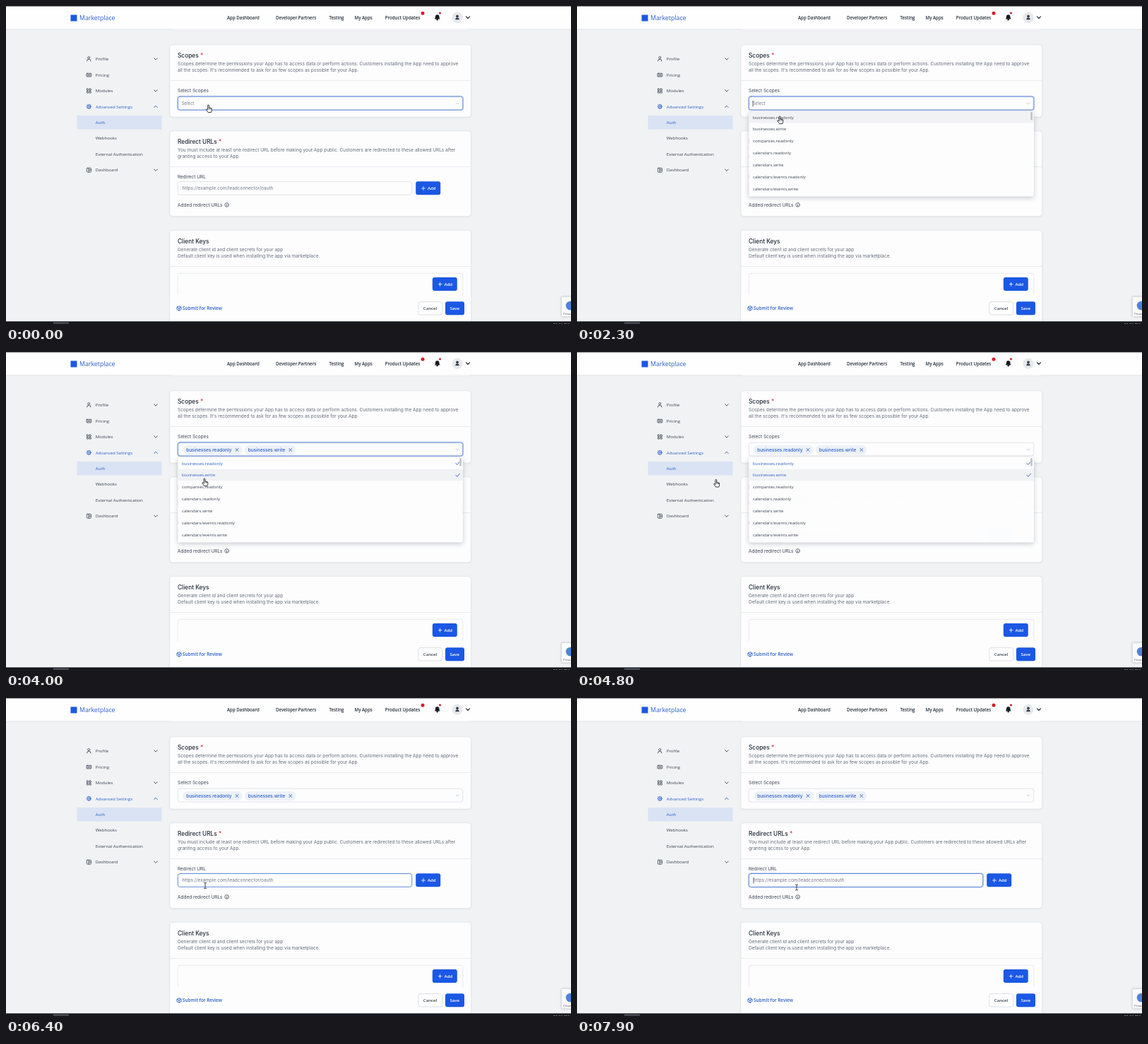
An HTML page with a canvas that plays this animation: 800 by 450 pixels, repeating every 8000 ms.

```html
<!DOCTYPE html>
<html lang="en">
<head>
<meta charset="utf-8">
<title>App scopes</title>
<style>
html, body { margin: 0; width: 100%; height: 100%; overflow: hidden; background: #f0f2f4; }
canvas { display: block; width: 800px; height: 450px; }
</style>
</head>
<body>
<canvas id="stage"></canvas>
<script>
const canvas = document.getElementById('stage');
const ratio = window.devicePixelRatio || 1;
canvas.width = 800 * ratio;
canvas.height = 450 * ratio;
const c = canvas.getContext('2d');

const LOOP = 8000;
const UI = '"Open Sans", "Noto Sans", sans-serif';
const INTER = 'Inter, sans-serif';
const BLUE = '#1b58e3', LINK = '#2a5fc9', INK = '#232b38', TEXT = '#3b4350', MUTED = '#636a76', LINE = '#e3e6ea';

const SCOPES = ['businesses.readonly', 'businesses.write', 'companies.readonly', 'calendars.readonly',
  'calendars.write', 'calendars/events.readonly', 'calendars/events.write'];
const ROW = 16.85;

// Moments of the interaction, in ms
const OPEN = 1700, PICK_1 = 2800, PICK_2 = 3600, CLOSE = 4800, FOCUS_URL = 6900;
const POINTER = [
  [0, 286.5, 140], [1800, 286.5, 140], [2200, 287, 156], [2900, 287, 156], [3400, 281, 174],
  [3700, 281, 179], [4200, 281, 179], [4900, 192, 180.5], [5500, 192, 180.5],
  [6200, 282, 265.5], [7000, 282, 265.5], [7600, 311, 268], [8000, 311, 268]
];

function text(s, x, y, size = 6.49, color = TEXT, font = INTER, weight = 400) {
  c.font = `${weight} ${size}px ${font}`;
  c.fillStyle = color;
  c.fillText(s, x, y);
}

function box(x, y, w, h, r, fill, stroke, lineWidth = 0.8) {
  c.beginPath();
  c.roundRect(x, y, w, h, r);
  if (fill) { c.fillStyle = fill; c.fill(); }
  if (stroke) { c.strokeStyle = stroke; c.lineWidth = lineWidth; c.stroke(); }
}

function path(points, color, width = 0.9) {
  c.beginPath();
  points.forEach(([x, y]) => c.lineTo(x, y));
  c.strokeStyle = color;
  c.lineWidth = width;
  c.stroke();
}

function dot(x, y, r, fill, stroke, width = 0.9) {
  c.beginPath();
  c.arc(x, y, r, 0, Math.PI * 2);
  if (fill) { c.fillStyle = fill; c.fill(); }
  if (stroke) { c.strokeStyle = stroke; c.lineWidth = width; c.stroke(); }
}

function shadow(color, blur, y, draw) {
  c.save();
  c.shadowColor = color;
  c.shadowBlur = blur * ratio;
  c.shadowOffsetY = y * ratio;
  draw();
  c.restore();
}

const chevron = (x, y, dir, color, w = 2.3, width = 0.9) =>
  path([[x - w, y - dir * w / 2], [x, y + dir * w / 2], [x + w, y - dir * w / 2]], color, width);

function cross(x, y, r, color, width) {
  path([[x - r, y - r], [x + r, y + r]], color, width);
  path([[x - r, y + r], [x + r, y - r]], color, width);
}

function person(x, y, color, filled) {
  dot(x, y - 1.5, 1.5, filled && color, color, 0.8);
  c.beginPath();
  c.arc(x, y + 3.3, 2.7, Math.PI, 0);
  if (filled) { c.fillStyle = color; c.fill(); }
  else { c.lineWidth = 0.9; c.strokeStyle = color; c.stroke(); }
}

function header() {
  shadow('rgba(30,40,60,.1)', 2, 0.5, () => box(0, 0, 800, 32.5, 0, '#fefefe'));
  c.fillStyle = '#85878b';
  c.fillRect(0, 0, 800, 0.9);
  box(91.5, 12.5, 9, 9, 0, BLUE);
  text('Marketplace', 104, 20, 8.8, LINK, UI, 500);
  [['App Dashboard', 313], ['Developer Partners', 382], ['Testing', 457.5], ['My Apps', 493.5],
    ['Product Updates', 536.7]].forEach(([s, x]) => text(s, x, 18.8, 6.15, INK, UI, 600));
  dot(590, 10.3, 2.5, '#d4202b');
  c.fillStyle = '#15191f';
  c.beginPath();
  c.moveTo(606.8, 18.6);
  c.quadraticCurveTo(608, 17.5, 608, 15);
  c.arc(610.7, 15, 2.7, Math.PI, 0);
  c.quadraticCurveTo(613.4, 17.5, 614.6, 18.6);
  c.fill();
  dot(610.7, 19.2, 1.2, '#15191f');
  dot(614.5, 10, 1.6, '#d4202b');
  dot(639, 16.3, 7.6, '#e7e9ec');
  person(639, 16, '#303844', true);
  chevron(654, 16.2, 1, '#20262f', 2.6, 1.1);
}

function sidebar() {
  box(100.5, 155, 120, 19.4, 0, '#dae3f3');
  [['Profile', 75, 1], ['Pricing', 97.5, 0], ['Modules', 120, 1], ['Advanced Settings', 142.3, -1],
    ['Auth', 164.8, 0], ['Webhooks', 187.2, 0], ['External Authentication', 209.7, 0], ['Dashboard', 232.2, 1]]
    .forEach(([s, y, dir], i) => {
      const color = i === 3 || i === 4 ? LINK : TEXT;
      text(s, 126.8, y + 2.2, 6.13, color, UI);
      if (dir) chevron(212, y, dir, color);
    });
  person(117.3, 74.6, TEXT);
  box(114, 95.3, 6.8, 4.6, 0.7, null, TEXT);
  dot(117.4, 97.6, 0.9, null, TEXT, 0.7);
  path([[115.6, 95.5], [115.6, 99.8]], TEXT, 0.5);
  path([[119.2, 95.5], [119.2, 99.8]], TEXT, 0.5);
  for (const x of [114.5, 118.1]) for (const y of [117.2, 120.8]) box(x, y, 2.3, 2.3, 0.3, null, TEXT);
  dot(117.4, 142.3, 2.6, null, LINK);
  dot(117.4, 142.3, 1, null, LINK, 0.8);
  for (let i = 0; i < 8; i++) {
    const a = i * Math.PI / 4;
    dot(117.4 + 3.1 * Math.cos(a), 142.3 + 3.1 * Math.sin(a), 0.55, LINK);
  }
  box(114.4, 229.3, 6, 5.8, 0.7, null, TEXT);
  path([[117.2, 229.3], [117.2, 235.1]], TEXT);
  path([[117.2, 232], [120.4, 232]], TEXT);
}

function card(y, h, divider, title, required, lines) {
  shadow('rgba(30,40,60,.13)', 2.5, 0.6, () => box(232, y, 426.3, h, 4, '#fdfdfe'));
  box(232, y, 426.3, h, 4, null, '#e4e7eb', 0.6);
  c.fillStyle = LINE;
  c.fillRect(232, divider, 426.3, 0.7);
  text(title, 243, y + 18.3, 8.3, INK, INTER, 500);
  if (required) text('*', 243 + c.measureText(title).width + 2.3, y + 18.3, 8.3, '#d9303b', INTER, 500);
  lines.forEach((s, i) => text(s, 243, y + 29 + i * 9.3, 6.49, MUTED));
}

function field(x, y, w, h, state) {
  if (state === 'focus') box(x, y, w, h, 3, null, '#d2def6', 3.2);
  box(x, y, w, h, 3, '#fdfdfe', state ? '#547fd2' : '#dcdfe4', state ? 0.9 : 0.8);
}

function addButton(x, y) {
  box(x, y, 35, 19, 3, BLUE);
  path([[x + 8.2, y + 9.7], [x + 13.2, y + 9.7]], '#fff', 0.8);
  path([[x + 10.7, y + 7.2], [x + 10.7, y + 12.2]], '#fff', 0.8);
  text('Add', x + 16.7, y + 12, 6.1, '#fff', UI, 600);
}

function tag(s, x, w) {
  box(x, 132, w, 13, 6, '#edf1f8');
  text(s, x + 4.7, 140.8, 6.49, LINK, INTER, 500);
  cross(x + w - 7.3, 138.5, 1.9, LINK, 0.9);
}

function tick(x, y, color) {
  path([[x - 2.6, y], [x - 0.8, y + 1.9], [x + 2.8, y - 2.1]], color, 0.9);
}

function page(t) {
  c.fillStyle = '#f0f2f4';
  c.fillRect(0, 0, 800, 450);
  box(232, 20, 426.3, 14.3, 3, '#fdfdfe', '#e2e5e9', 0.6);
  header();
  sidebar();

  card(55, 102, 105.3, 'Scopes', true, [
    'Scopes determine the permissions your App has to access data or perform actions. Customers installing the App need to approve',
    "all the scopes. It's recommended to ask for as few scopes as possible for your App."]);
  text('Select Scopes', 243, 122.3);
  field(243.4, 128.2, 403.4, 18.8, t < CLOSE ? 'focus' : '');
  if (t < PICK_1) text('Select', 248.7, 140.3, 6.5, '#747b86', UI);
  else tag(SCOPES[0], 250.5, 83.8);
  if (t >= PICK_2) tag(SCOPES[1], 338, 72);
  if (t >= OPEN && t < PICK_1 && Math.floor((t - OPEN) / 500) % 2 === 1) path([[249, 134], [249, 142.2]], INK, 0.7);
  chevron(639, 138, 1, '#c2c6cc', 2.1, 0.8);

  card(177, 120.5, 227.3, 'Redirect URLs', true, [
    'You must include at least one redirect URL before making your App public. Customers are redirected to these allowed URLs after',
    'granting access to your App.']);
  text('Redirect URL', 243, 244.4);
  const hover = t >= 6050;
  field(243.4, 248.5, 331.3, 18.8, t >= FOCUS_URL ? 'focus' : hover ? 'hover' : '');
  text('https://example.com/leadconnector/oauth', 249.5, 260.4, 6.49, '#747b86');
  if (t >= FOCUS_URL && Math.floor((t - FOCUS_URL) / 500) % 2 === 0) path([[250, 254], [250, 262.3]], INK, 0.7);
  addButton(580.2, 248.3);
  text('Added redirect URLs', 243, 283.7);
  dot(312.6, 281.4, 2.8, null, TEXT, 0.8);
  path([[312.6, 281], [312.6, 283]], TEXT, 0.8);
  dot(312.6, 279.9, 0.45, TEXT);

  card(317.5, 140, 368, 'Client Keys', false, [
    'Generate client id and client secrets for your app',
    'Default client key is used when installing the app via marketplace.']);
  box(243.4, 378.3, 403.4, 40, 3, null, LINE);
  addButton(603.8, 384);
  box(232.4, 409, 425.6, 37.5, 0, '#fdfdfe');

  path([[245, 424.7], [248, 426.2], [248, 429.4], [245, 431], [242, 429.4], [242, 426.2], [245, 424.7]], LINK);
  path([[242, 426.2], [245, 427.8], [248, 426.2]], LINK);
  path([[245, 427.8], [245, 431]], LINK);
  text('Submit for Review', 250, 430.2, 6.4, LINK, UI, 600);
  box(583.8, 418.5, 34, 18.5, 3, '#fefefe', '#d6d9de');
  text('Cancel', 590.8, 430.1, 6.1, TEXT, UI, 600);
  box(622, 418.3, 27, 19, 3, BLUE);
  text('Save', 628.4, 430.1, 6.1, '#fff', UI, 600);

  shadow('rgba(80,80,90,.55)', 2.5, 0, () => box(786.5, 411.5, 24, 28, 1, '#fafafa'));
  dot(799, 424, 6.3, '#4f83d8');
  text('Privacy', 789.3, 437.4, 3.9, '#555', UI);

  c.fillStyle = '#15171c';
  c.fillRect(0, 446.3, 800, 4);
  c.fillStyle = '#42454b';
  c.fillRect(67, 446.3, 22, 4);
  text('03:36 PM', 774.5, 452.6, 5.4, '#d0d2d5', UI);
}

function menu(t, y) {
  const alpha = Math.min(1, Math.max(0, (t - OPEN) / 150)) * Math.min(1, Math.max(0, (CLOSE + 150 - t) / 150));
  if (!alpha) return;
  c.save();
  c.globalAlpha = alpha;
  shadow('rgba(30,40,60,.24)', 6, 2, () => box(243.3, 148.8, 403.6, 120.6, 2, '#fdfdfe'));
  const active = y > 166 || t > 3300 ? 1 : 0;
  box(243.3, 149 + active * ROW, 403.6, ROW - 0.4, 0, '#f1f2f4');
  SCOPES.forEach((s, i) => {
    const picked = (i === 0 && t >= PICK_1) || (i === 1 && t >= PICK_2);
    const rowY = 157.3 + i * ROW;
    text(s, 249, rowY + 2.2, 6.1, picked ? LINK : TEXT, UI);
    if (picked) tick(639.5, rowY + 0.3, LINK);
  });
  box(642.3, 150, 2.5, 11.5, 1.2, '#bfc1c5');
  c.restore();
}

function pointerAt(t) {
  const i = Math.max(1, POINTER.findIndex(p => p[0] > t));
  const [t0, x0, y0] = POINTER[i - 1], [t1, x1, y1] = POINTER[i];
  const k = (t - t0) / (t1 - t0), e = k * k * (3 - 2 * k);
  return [x0 + (x1 - x0) * e, y0 + (y1 - y0) * e];
}

function shape(d) {
  const p = new Path2D(d);
  c.fillStyle = '#fff';
  c.fill(p);
  c.strokeStyle = '#14161a';
  c.lineWidth = 0.85;
  c.stroke(p);
}

function pointer(t, x, y) {
  c.save();
  c.translate(x, y);
  if (t >= 6050) {
    path([[-1.6, -4], [-0.5, -4], [0, -3.5], [0.5, -4], [1.6, -4]], '#14161a', 0.8);
    path([[0, -3.5], [0, 3.5]], '#14161a', 0.8);
    path([[-1.6, 4], [-0.5, 4], [0, 3.5], [0.5, 4], [1.6, 4]], '#14161a', 0.8);
  } else if (x > 243 && t < CLOSE || x < 220) {
    shape('M-.9 6.2V.9Q-.9 0 0 0T.9 .9V4Q1.8 3.3 2.4 4.3Q3.2 3.8 3.7 4.7Q4.8 4.5 4.8 5.6V7.5Q4.8 9 3.9 10.6H-.3Q-1.4 8.8-2.8 7.3Q-3.4 6.5-2.8 6Q-2 5.6-.9 6.8Z');
    path([[0.9, 4], [0.9, 6]], '#14161a', 0.6);
    path([[2.4, 4.4], [2.4, 6.1]], '#14161a', 0.6);
    path([[3.7, 4.8], [3.7, 6.2]], '#14161a', 0.6);
  } else {
    shape('M0 0V8.5L2 6.7L3.3 9.6L4.6 9L3.4 6.2H6Z');
  }
  c.restore();
}

function frame(now) {
  const t = now % LOOP;
  const [x, y] = pointerAt(t);
  c.setTransform(ratio, 0, 0, ratio, 0, 0);
  c.lineCap = c.lineJoin = 'round';
  page(t);
  menu(t, y);
  pointer(t, x, y);
  requestAnimationFrame(frame);
}
requestAnimationFrame(frame);
</script>
</body>
</html>
```
